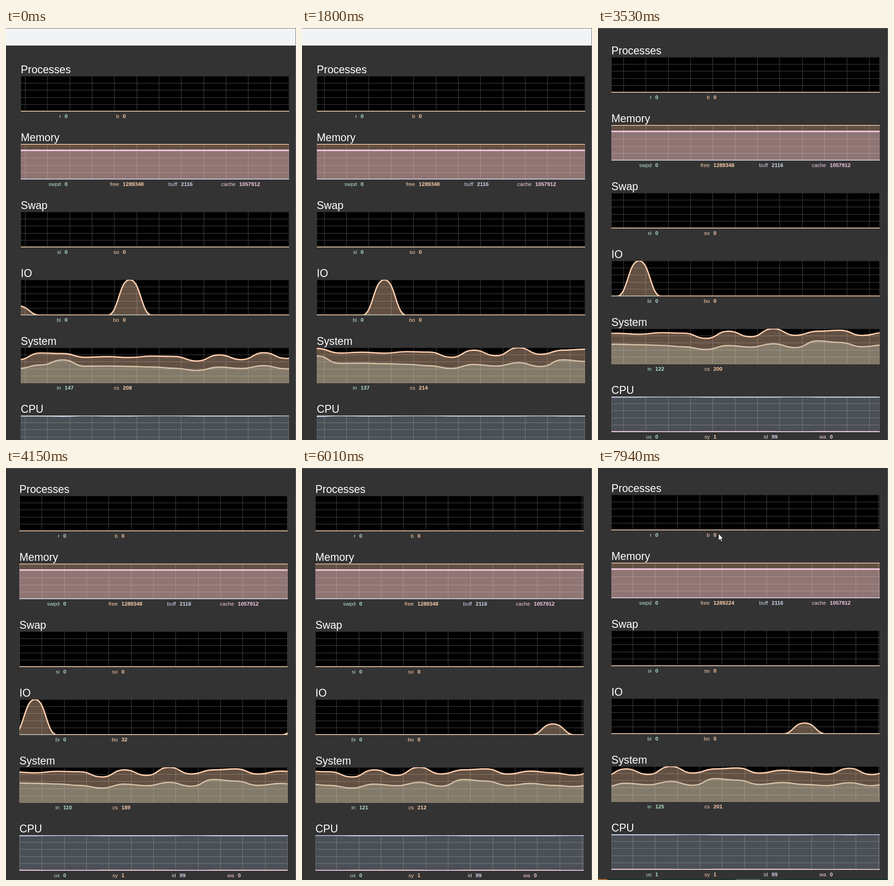
These frames come from a looping animation (628x892 px, 8000 ms). An HTML page with a canvas:

```html
<!DOCTYPE html>
<html lang="en">
<head>
<meta charset="utf-8">
<title>System monitor</title>
<style>
html, body { margin: 0; width: 100%; height: 100%; overflow: hidden; background: #333; }
#stage { position: relative; width: 628px; height: 892px; overflow: hidden;
  font-family: "Liberation Sans", Arial, sans-serif; }
#page, #page *, #stage > i, #cursor { position: absolute; }
#page { left: 0; top: 0; width: 628px; height: 940px; }
.head { left: -10px; right: -10px; top: -100px; height: 138px; background: #f2f3f5; }
.bar { left: -10px; top: 936px; width: 660px; height: 40px; background: #1c332c; }
.bar b { top: 0; height: 40px; }
section { left: 32px; width: 581px; height: 100px; }
h2 { margin: 0; left: 0; top: -26px; font: 23.2px/24px "Liberation Sans", Arial, sans-serif; color: #fff; }
canvas { left: 0; top: 0; }
.key, .val { top: 80px; font-size: 11.6px; line-height: 14px; white-space: nowrap; }
.val { font-weight: bold; }
#edgeTop { left: 0; top: 0; width: 628px; height: 1px; background: #666; }
#edgeRight { left: 627px; top: 0; width: 1px; height: 892px; background: #707070; }
#cursor { left: 260px; top: 141px; }
</style>
</head>
<body>
<div id="stage">
  <div id="page">
    <div class="head"></div>
    <div class="bar">
      <b style="left:0;width:33px;background:#b5692e"></b>
      <b style="left:311px;width:53px;background:#4f625a"></b>
    </div>
  </div>
  <i id="edgeTop"></i>
  <i id="edgeRight"></i>
  <svg id="cursor" width="14" height="21" viewBox="0 0 14 21">
    <path d="M1 1V16.2L4.5 13L6.9 18.6L9.3 17.6L6.9 12.1H11.6Z" fill="#fff" stroke="#000" stroke-width=".9"/>
  </svg>
</div>
<script>
const LOOP = 8000, W = 581, H = 77, STEP = 48.36, PHASE = 0.69;
const GREEN = '#b3e2cd', ORANGE = '#fdcdac', BLUE = '#cbd5e8', PINK = '#f4cae4';
const COLORS = [GREEN, ORANGE, BLUE, PINK];
const FIRST = -1, LAST = 21;

// Samples, one per second, starting at index FIRST
const interrupts = [108, 134, 171, 125, 126, 123, 119, 110, 93, 118, 108, 129, 105, 147, 137, 110, 122, 110, 103, 121, 102, 125, 115];
const switches = [173, 222, 218, 190, 195, 189, 199, 196, 163, 208, 173, 224, 182, 208, 214, 181, 200, 189, 174, 212, 172, 201, 190];
const idle = n => n === 1 ? 98 : [2, 5, 6, 11, 17, 19].includes(n) ? 100 : 99;
const blocks = n => ({ '-1': 27, 4: 103, 16: 32 })[n] || 0;
const at = list => n => list[n - FIRST];
const zero = () => 0;

// Each series: name, value, maximum, fill opacity, optional line colour
const charts = [
  ['Processes', ['r', zero, 1, 0], ['b', zero, 1, 0]],
  ['Memory', ['swpd', zero, 1, 0], ['free', n => n < 20 ? 1289348 : 1289224, 1289348, .39],
    ['buff', () => 2116, 1289348, 0], ['cache', () => 1057912, 1289348, .3]],
  ['Swap', ['si', zero, 1, 0], ['so', zero, 1, 0]],
  ['IO', ['bi', zero, 1, 0], ['bo', blocks, 103, .39]],
  ['System', ['in', at(interrupts), 224, .3, '#b8b4a0'], ['cs', at(switches), 224, .39]],
  ['CPU', ['us', n => n === 20 ? 1 : 0, 100, 0], ['sy', n => 100 - idle(n), 100, 0],
    ['id', idle, 100, .37], ['wa', zero, 100, 0]]
];

const page = document.getElementById('page');
const edgeTop = document.getElementById('edgeTop');
const cursor = document.getElementById('cursor');

function add(parent, tag, cls, text = '') {
  const el = document.createElement(tag);
  if (cls) el.className = cls;
  el.textContent = text;
  return parent.appendChild(el);
}

const views = charts.map(([title, ...series], i) => {
  const box = add(page, 'section');
  box.style.top = 104 + 147 * i + 'px';
  add(box, 'h2', '', title);
  const canvas = add(box, 'canvas');
  canvas.width = W;
  canvas.height = H;
  const values = series.map(([name], j) => {
    const key = add(box, 'span', 'key', name), val = add(box, 'span', 'val');
    key.style.right = W - 87 - 126 * j + 'px';
    val.style.left = 95 + 126 * j + 'px';
    key.style.color = val.style.color = COLORS[j];
    return val;
  });
  return { title, series, values, ctx: canvas.getContext('2d') };
});

// Bursts of redraws: first time, last time, count
const bursts = [[0, 0, 1], [150, 1110, 8], [1260, 2190, 8], [2340, 2580, 3], [3260, 4300, 9],
  [4420, 5380, 8], [5500, 6520, 9], [6670, 7640, 8], [7790, 7940, 2]];

function lastTick(t) {
  let tick = 0;
  for (const [a, b, n] of bursts)
    for (let i = 0; i < n; i++) {
      const time = Math.floor((a + (b - a) * i / Math.max(1, n - 1)) / 10) * 10;
      if (time <= t) tick = time;
    }
  return tick;
}

function mix(keys, t) {
  for (let i = 1; i < keys.length; i++) {
    const [a, x] = keys[i - 1], [b, y] = keys[i];
    if (t <= b) return x + (y - x) * (t - a) / (b - a);
  }
  return keys[keys.length - 1][1];
}

const scroll = [[0, 9.3], [830, -32.4], [2580, -120.1], [3520, -167], [4960, -239.3], [6010, -292.8], [7940, -388.9]];
const pan = [[0, 0], [3250, 0], [3260, -41], [3520, -41], [4960, -50], [6010, -44], [6520, -46]];

function drawGrid(ctx, offset) {
  ctx.fillStyle = '#000';
  ctx.fillRect(0, 0, W, H);
  ctx.fillStyle = '#444';
  for (let x = (offset % STEP + STEP) % STEP; x < W; x += STEP) ctx.fillRect(Math.round(x - .5), 0, 1, H);
  for (let i = 1; i < 5; i++) ctx.fillRect(0, Math.round(i * H / 5 - .5), W, 1);
  ctx.strokeStyle = '#444';
  ctx.lineWidth = 1;
  ctx.strokeRect(0, 0, W, H);
}

function trace(ctx, value, max, offset) {
  let px, py;
  ctx.beginPath();
  for (let n = FIRST; n <= LAST; n++) {
    const x = offset + STEP * (n + PHASE), y = H - H * value(n) / max;
    if (n === FIRST) ctx.moveTo(x, y);
    else ctx.bezierCurveTo((px + x) / 2, py, (px + x) / 2, y, x, y);
    px = x;
    py = y;
  }
  return px;
}

function drawSeries(ctx, [, value, max, alpha, line], color, offset, zoom) {
  const top = max / zoom;
  if (alpha) {
    const end = trace(ctx, value, top, offset);
    ctx.lineTo(end, H + 3);
    ctx.lineTo(offset + STEP * (FIRST + PHASE), H + 3);
    ctx.globalAlpha = alpha;
    ctx.fillStyle = color;
    ctx.fill();
    ctx.globalAlpha = 1;
  }
  trace(ctx, value, top, offset);
  ctx.strokeStyle = line || color;
  ctx.lineWidth = 2.9;
  ctx.stroke();
}

function render(t) {
  const offset = mix(scroll, t), dy = Math.round(mix(pan, t));
  const newest = 12 + Math.floor((9.3 - offset) / STEP + .1);
  // The System chart rescales once an old maximum has dropped out
  const rescale = t < 360 ? .857 : 1 - .143 * Math.exp((360 - t) / 110);
  page.style.transform = `translate(${dy ? -3 : 0}px, ${dy}px)`;
  edgeTop.style.display = t < 6520 ? 'block' : 'none';
  cursor.style.display = t < 6520 ? 'none' : 'block';
  for (const { title, series, values, ctx } of views) {
    drawGrid(ctx, offset);
    series.forEach((s, j) => {
      drawSeries(ctx, s, COLORS[j], offset, title === 'System' ? rescale : 1);
      values[j].textContent = s[1](newest);
    });
  }
}

let shown = -1;
function frame() {
  const tick = lastTick(performance.now() % LOOP);
  if (tick !== shown) render(shown = tick);
  requestAnimationFrame(frame);
}
frame();
</script>
</body>
</html>
```
